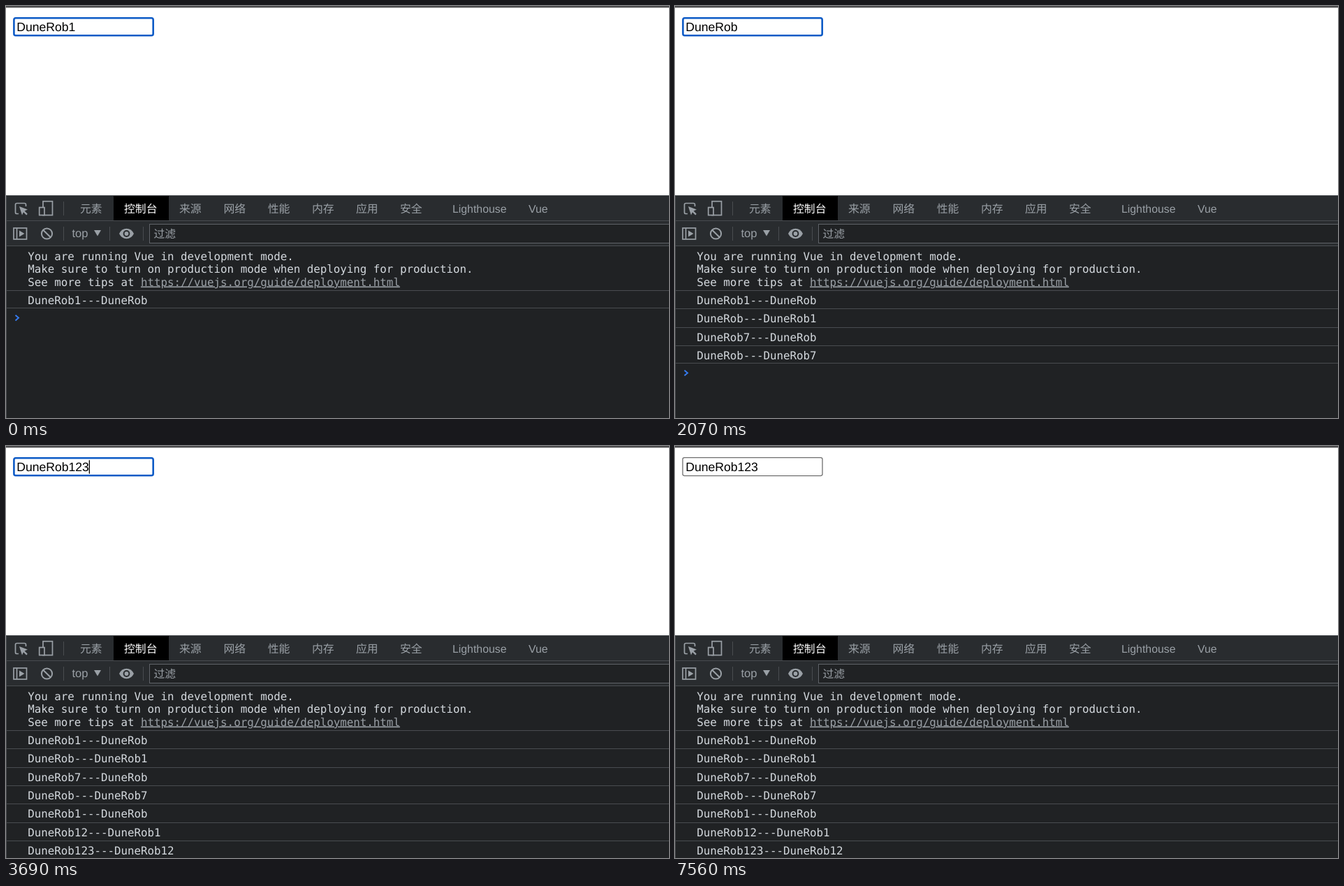
Animation of 949x590 px, one loop 7740 ms. Source, as an HTML page:

```html
<!DOCTYPE html>
<html lang="zh-CN">
<head>
<meta charset="utf-8">
<title>Watch demo</title>
<style>
  html, body { margin: 0; width: 100%; height: 100%; overflow: hidden; background: #fff; }
  svg { display: block; width: 949px; height: 590px; }
  text { text-rendering: geometricPrecision; white-space: pre; }
  .ui { font: 15.84px "Liberation Sans", "Noto Sans CJK SC", "Noto Sans CJK", sans-serif; fill: #9aa0a6; }
  .mono { font: 15.8px "DejaVu Sans Mono", monospace; fill: #d3d8dd; }
  .field { font: 17.6px "Liberation Sans", sans-serif; fill: #000; }
  .line { fill: #494c50; shape-rendering: crispEdges; }
  .icon { fill: none; stroke: #9aa0a6; stroke-width: 1.7; }
  .solid { fill: #9aa0a6; }
</style>
</head>
<body>
<svg viewBox="0 0 949 590" xmlns="http://www.w3.org/2000/svg">
  <rect width="949" height="590" fill="#fff"/>
  <rect width="949" height="2.4" fill="#4b4b4d"/>

  <rect id="box" fill="#fff"/>
  <text id="value" class="field" x="15.2" y="36"></text>
  <rect id="caret" y="20.3" width="1.3" height="19.4"/>

  <rect y="271" width="949" height="73" fill="#292c2f"/>
  <rect y="343" width="949" height="247" fill="#202224"/>
  <g class="line">
    <rect y="271" width="949" height="1"/>
    <rect y="307" width="949" height="1"/>
    <rect y="343" width="949" height="1"/>
    <rect y="407" width="949" height="1"/>
    <rect y="271" width="1" height="319"/>
    <rect x="82" y="280" width="1" height="20"/>
    <rect x="82" y="316" width="1" height="20"/>
    <rect x="148" y="316" width="1" height="20"/>
    <rect x="196" y="316" width="1" height="20"/>
  </g>
  <rect x="154" y="272" width="79" height="35" fill="#000"/>
  <g id="tabs"></g>

  <g class="icon">
    <path d="M18 297.5H15.5a2 2 0 0 1-2-2V284.5a2 2 0 0 1 2-2H26.500a2 2 0 0 1 2 2V287"/>
    <rect x="53" y="279.700" width="13.500" height="19.800"/>
    <rect x="47.700" y="288.500" width="7.300" height="11" fill="#292c2f"/>
    <rect x="11" y="318" width="18.500" height="16"/>
    <path d="M15.500 318V334"/>
    <circle cx="58.500" cy="326" r="7.600" stroke-width="2"/>
    <path d="M53.200 320.700L63.800 331.300" stroke-width="2"/>
  </g>
  <g class="solid">
    <path d="M19 287L31 291.500L26.600 293.600L30.800 297.800L29.200 299.400L25 295.200L23 299.500Z"/>
    <path d="M19 321.500L26.500 326L19 330.500Z"/>
    <path d="M126 321H136L131 329.500Z"/>
    <path d="M162 326Q165.500 318.700 172.500 318.700T183 326Q179.500 333.300 172.500 333.300T162 326Z"/>
  </g>
  <circle cx="172.500" cy="326" r="4.900" fill="#292c2f"/>
  <circle cx="172.500" cy="326" r="2.900" class="solid"/>
  <text class="ui" x="94.500" y="331" style="font-size:16.500px">top</text>
  <rect x="205.500" y="312.500" width="760" height="27" fill="#202224" stroke="#5f6368"/>
  <text class="ui" x="211.500" y="332">过滤</text>

  <text class="mono" x="31.300" y="363.500">You are running Vue in development mode.</text>
  <text class="mono" x="31.300" y="382">Make sure to turn on production mode when deploying for production.</text>
  <text class="mono" x="31.300" y="400.500">See more tips at <tspan fill="#9aa0a6" text-decoration="underline">https://vuejs.org/guide/deployment.html</tspan></text>

  <g id="logs"></g>
  <path id="prompt" d="M13.500 -3.800L18 0L13.500 3.800" fill="none" stroke="#367cf1" stroke-width="1.900"/>
  <path id="mouse" d="M0.700 0.800V17.500L4.500 14L7 19.600L9.700 18.400L7.300 13H12.200Z" stroke="#fff" stroke-width="1.300" paint-order="stroke"
        style="filter:drop-shadow(0 1px 1px rgba(0,0,0,.35))"/>
</svg>
<script>
const LOOP = 7740, STEP = 90, ROW = 26.3;
const NAME = "DuneRob";
const BLUR_AT = 6840;

// Typed suffix from each moment on
const edits = [[0, "1"], [360, ""], [1260, "7"], [2070, ""], [2880, "1"], [3330, "12"], [3690, "123"]];
const caretOn = [[450, 900], [1260, 1710], [2250, 2700], [2880, 4140], [4680, 5130], [5670, 6120], [6660, BLUR_AT]];
const mouseSpan = [5490, 6120];

const $ = id => document.getElementById(id);
const set = (el, attrs) => { for (const k in attrs) el.setAttribute(k, attrs[k]); return el; };
const add = (parent, tag, attrs, text = "") => {
  const el = set(document.createElementNS("http://www.w3.org/2000/svg", tag), attrs);
  el.textContent = text;
  parent.append(el);
  return el;
};
const show = (el, on) => { el.style.display = on ? "" : "none"; };
const within = (t, [from, to]) => t >= from && t < to;

const tabs = { 元素: 106, 控制台: 169, 来源: 248, 网络: 311.4, 性能: 374.7, 内存: 438, 应用: 501, 安全: 564, Lighthouse: 639, Vue: 748 };
for (const [label, x] of Object.entries(tabs)) {
  const tab = add($("tabs"), "text", { class: "ui", x, y: 295.5 }, label);
  if (label === "控制台") tab.style.fill = "#fff";
}

const rows = edits.map(([, suffix], i) => {
  const old = i ? edits[i - 1][1] : "";
  const g = add($("logs"), "g", {});
  add(g, "text", { class: "mono", x: 31.3, y: 427 + ROW * i }, `${NAME}${suffix}---${NAME}${old}`);
  const line = add(g, "rect", { class: "line", width: 949, height: 1 });
  return { g, line };
});

function drawField(t, suffix) {
  const focused = t < BLUR_AT;
  set($("box"), focused
    ? { x: 11.4, y: 17.2, width: 199.3, height: 25, rx: 2.5, stroke: "#0d5bc6", "stroke-width": 2.6 }
    : { x: 11, y: 16.6, width: 200, height: 26, rx: 2.5, stroke: "#6f6f6f", "stroke-width": 1.3 });
  const value = $("value");
  if (value.textContent !== NAME + suffix) value.textContent = NAME + suffix;
  set($("caret"), { x: 15 + value.getComputedTextLength() });
  show($("caret"), caretOn.some(span => within(t, span)));
}

function drawLogs(count) {
  rows.forEach(({ g, line }, i) => {
    show(g, i < count);
    const end = 407 + ROW * (i + 1);
    set(line, { y: Math.round(i === count - 1 ? end - 1 : end) });
  });
  set($("prompt"), { transform: `translate(0 ${446.6 + ROW * (count - 1)})` });
}

function drawMouse(t) {
  show($("mouse"), within(t, mouseSpan));
  const last = mouseSpan[1] - STEP;
  const p = Math.min(1, Math.max(0, (t - mouseSpan[0]) / (last - mouseSpan[0]))) ** 1.5;
  set($("mouse"), { transform: `translate(${194 + 603 * p} ${90 - 60 * p})` });
}

function draw(now) {
  const t = Math.floor((now % LOOP) / STEP) * STEP;
  const count = edits.filter(([at]) => at <= t).length;
  drawField(t, edits[count - 1][1]);
  drawLogs(count);
  drawMouse(t);
}

const start = performance.now();
function tick() {
  draw(performance.now() - start);
  requestAnimationFrame(tick);
}
tick();
</script>
</body>
</html>
```
